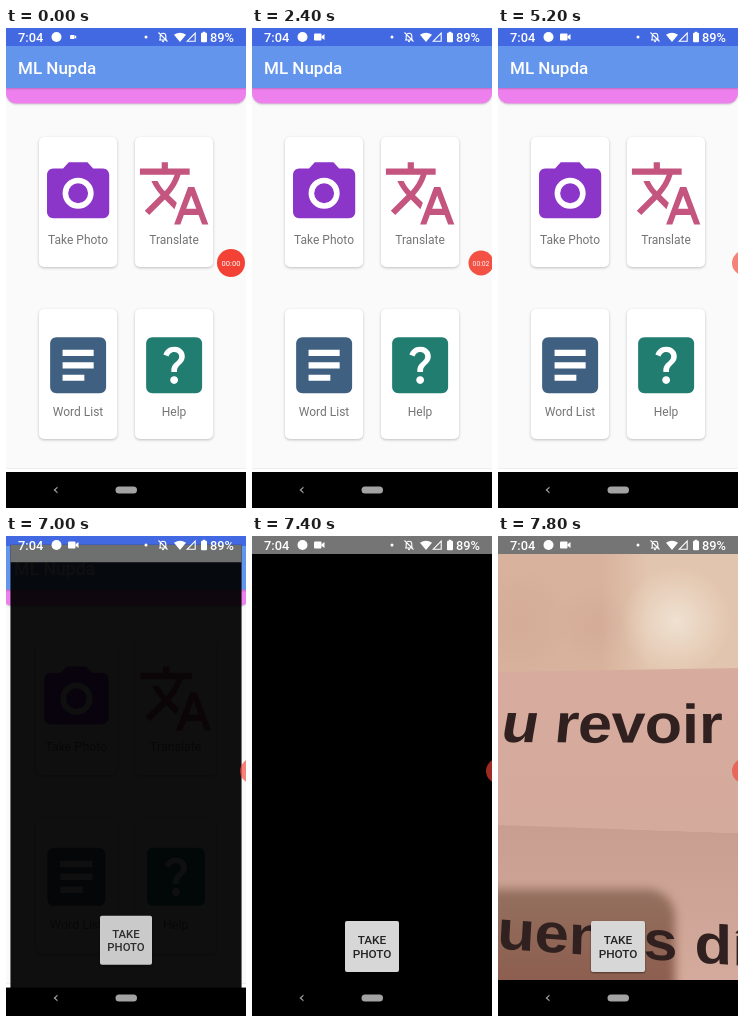
Write an HTML page with a canvas that moves like this. It is 240 px wide and 480 px high and loops after 8 s.

```html
<!DOCTYPE html>
<html lang="en">
<head>
<meta charset="utf-8">
<title>ML Nupda</title>
<style>
html, body { margin: 0; width: 100%; height: 100%; overflow: hidden; background: #000; }
canvas { display: block; width: 240px; height: 480px; }
</style>
</head>
<body>
<canvas id="stage"></canvas>
<script>
const W = 240, H = 480, LOOP = 8000, TICK = 200;
const canvas = document.getElementById('stage');
const ctx = canvas.getContext('2d');
const dpr = window.devicePixelRatio || 1;
canvas.width = W * dpr;
canvas.height = H * dpr;

const UI = 'Roboto, "Noto Sans", sans-serif';
const PRINT = '"Liberation Sans", Arial, sans-serif';
const SQUARE = 'M19 3H5c-1.1 0-2 .9-2 2v14c0 1.1.9 2 2 2h14c1.1 0 2-.9 2-2V5c0-1.1-.9-2-2-2z';

// Icons on a 24-unit grid: coloured shape, then white details
const CARDS = [
  { x: 33, y: 109, label: 'Take Photo', color: '#8b35c9',
    shape: 'M9 2L7.17 4H4c-1.1 0-2 .9-2 2v12c0 1.1.9 2 2 2h16c1.1 0 2-.9 2-2V6c0-1.1-.9-2-2-2h-3.17L15 2H9z',
    detail: 'M17 12a5 5 0 1 1-10 0a5 5 0 1 1 10 0zM15.2 12a3.2 3.2 0 1 0-6.4 0a3.2 3.2 0 1 0 6.4 0z' },
  { x: 129, y: 109, label: 'Translate', color: '#c3557f',
    shape: 'M12.87 15.07l-2.54-2.51.03-.03c1.74-1.94 2.98-4.17 3.71-6.53H17V4h-7V2H8v2H1v1.99h11.17C11.5 7.92 10.44 9.75 9 11.35 8.07 10.32 7.3 9.19 6.69 8h-2c.73 1.63 1.73 3.17 2.98 4.56l-5.09 5.02L4 19l5-5 3.11 3.11.76-2.04z' +
      'M18.5 10h-2L12 22h2l1.12-3h4.75L21 22h2l-4.5-12zm-2.62 7l1.62-4.33L19.12 17h-3.24z' },
  { x: 33, y: 281, label: 'Word List', color: '#3f6080', shape: SQUARE,
    detail: 'M7 7h10v2H7zM7 11h10v2H7zM7 15h7v2H7z' },
  { x: 129, y: 281, label: 'Help', color: '#217d70', shape: SQUARE,
    detail: 'M12.01 18c-.7 0-1.26-.56-1.26-1.26 0-.71.56-1.25 1.26-1.25.71 0 1.25.54 1.25 1.25-.01.69-.54 1.26-1.25 1.26z' +
      'M15.02 10.6c-.76 1.11-1.48 1.46-1.87 2.17-.16.29-.22.48-.22 1.41h-1.82c0-.49-.08-1.29.31-1.98.49-.87 1.42-1.39 1.96-2.16.57-.81.25-2.33-1.37-2.33-1.06 0-1.58.8-1.8 1.48l-1.65-.7C9.01 7.15 10.22 6 11.99 6c1.48 0 2.49.67 3.01 1.52.44.72.7 2.07.02 3.08z' }
];
for (const c of CARDS) {
  c.shape = new Path2D(c.shape);
  if (c.detail) c.detail = new Path2D(c.detail);
}

function rect(x, y, w, h, color) {
  ctx.fillStyle = color;
  ctx.fillRect(x, y, w, h);
}

function round(x, y, w, h, r, color) {
  ctx.fillStyle = color;
  ctx.beginPath();
  ctx.roundRect(x, y, w, h, r);
  ctx.fill();
}

function disc(x, y, r, color) {
  ctx.fillStyle = color;
  ctx.beginPath();
  ctx.arc(x, y, r, 0, Math.PI * 2);
  ctx.fill();
}

function poly(color, ...pts) {
  ctx.fillStyle = color;
  ctx.beginPath();
  for (let i = 0; i < pts.length; i += 2) ctx.lineTo(pts[i], pts[i + 1]);
  ctx.closePath();
  ctx.fill();
}

function text(s, x, y, font, color, align = 'left') {
  ctx.font = font;
  ctx.fillStyle = color;
  ctx.textAlign = align;
  ctx.fillText(s, x, y);
}

function shadow(color, blur, dy) {
  ctx.shadowColor = color;
  ctx.shadowBlur = blur * dpr;
  ctx.shadowOffsetY = dy * dpr;
}

function scoped(draw) {
  ctx.save();
  draw();
  ctx.restore();
}

function zoomed(scale, alpha, draw) {
  scoped(() => {
    ctx.globalAlpha = alpha;
    ctx.translate(W / 2, H / 2);
    ctx.scale(scale, scale);
    ctx.translate(-W / 2, -H / 2);
    draw();
  });
}

function card(c) {
  scoped(() => {
    shadow('rgba(0,0,0,.24)', 3, 1);
    round(c.x, c.y, 78, 130, 5, '#fff');
  });
  scoped(() => {
    ctx.translate(c.x + 1.8, c.y + 19);
    ctx.scale(3.11, 3.11);
    ctx.fillStyle = c.color;
    ctx.fill(c.shape);
    if (c.detail) {
      ctx.fillStyle = '#fff';
      ctx.fill(c.detail, 'evenodd');
    }
  });
  text(c.label, c.x + 39, c.y + 107, '12px ' + UI, '#757575', 'center');
}

function home() {
  rect(0, 0, W, 444, '#fafafa');
  rect(0, 440, W, 1, '#eeeeee');
  rect(0, 441, W, 3, '#fff');
  scoped(() => {
    shadow('rgba(0,0,0,.2)', 2, 1);
    round(0, 55, W, 20.5, [0, 0, 10, 10], '#ee80ee');
  });
  scoped(() => {
    shadow('rgba(0,0,0,.2)', 2, 1);
    rect(0, 18, W, 42, '#6495ed');
  });
  rect(0, 0, W, 18, '#4269e1');
  text('ML Nupda', 12, 46, '500 17px ' + UI, '#fff');
  CARDS.forEach(card);
}

function gradient(x0, y0, x1, y1, a, b) {
  const g = ctx.createLinearGradient(x0, y0, x1, y1);
  g.addColorStop(0, a);
  g.addColorStop(1, b);
  return g;
}

const vertical = (y0, y1, a, b) => gradient(0, y0, 0, y1, a, b);

function glow(x, y, r, rgb, a) {
  const g = ctx.createRadialGradient(x, y, 0, x, y, r);
  g.addColorStop(0, `rgba(${rgb},${a})`);
  g.addColorStop(1, `rgba(${rgb},0)`);
  rect(0, 18, W, 118, g);
}

const WARM = { desk: '#d6a078', bright: '#e6b78c', light: '238,216,186', dim: '184,126,88',
  top: '#e2a988', low: '#e2a986', fold: '#d59c7a', edge: '#94634a', dark: '#8a4a36', ink: '#30211d' };
const PINK = { desk: '#d8b29d', bright: '#e2c5ae', light: '244,234,220', dim: '194,146,126',
  top: '#d7ac9f', low: '#d4aa9c', fold: '#c79e8f', edge: '#94705f', dark: '#8d5f50', ink: '#30201f' };

// Printed words on the tilted sheet, leaning more towards its left edge
const TILT = .9;
function print(word, x, y, size, slope, lean, color) {
  ctx.font = `bold ${size}px ${PRINT}`;
  ctx.fillStyle = color;
  ctx.textAlign = 'left';
  for (const ch of word) {
    const w = ctx.measureText(ch).width;
    scoped(() => {
      ctx.translate(x, y + slope * x);
      ctx.transform(1, slope, -lean * Math.max(0, 1 - Math.max(0, x) / 130), TILT, 0, 0);
      ctx.fillText(ch, 0, 0);
    });
    x += w;
  }
}

function photo(p) {
  scoped(() => {
    ctx.beginPath();
    ctx.rect(0, 18, W, 426);
    ctx.clip();
    rect(0, 18, W, 426, gradient(105, 0, 150, 0, p.desk, p.bright));
    glow(178, 85, 55, p.light, .75);
    glow(20, 85, 55, p.dim, .2);
    glow(95, 88, 38, p.dim, .2);
    poly(vertical(132, 290, p.top, p.low), 0, 136, W, 132, W, 297, 0, 289);
    poly(vertical(290, 444, p.fold, p.low), 0, 289, W, 297, W, 444, 0, 444);
    scoped(() => {
      ctx.filter = `blur(${5 * dpr}px)`;
      round(-20, 353, 197, 120, [0, 28, 0, 0], vertical(352, 440, p.edge, p.dark));
    });
    print('Au revoir', -43, 206, 61, .005, .16, p.ink);
    print('Buenos días', -46, 412.5, 61.5, .07, .05, p.ink);
  });
}

function camera(view) {
  rect(0, 0, W, H, '#000');
  rect(0, 0, W, 18, '#757575');
  if (view) photo(view);
  scoped(() => {
    shadow('rgba(0,0,0,.45)', 2, 1);
    round(93, 385, 54, 51, 2, '#d7d7d7');
  });
  text('TAKE', 120, 408, '500 11.8px ' + UI, '#222', 'center');
  text('PHOTO', 120, 422, '500 11.8px ' + UI, '#222', 'center');
}

function statusBar(castScale) {
  const white = '#fff';
  text('7:04', 12, 14, '500 12.8px ' + UI, white);
  disc(50.5, 9, 5, white);
  scoped(() => {
    ctx.translate(67, 9);
    ctx.scale(castScale, castScale);
    round(-5, -3.5, 7.5, 7, 1, white);
    poly(white, 2.5, -.8, 5.5, -3, 5.5, 3, 2.5, .8);
  });
  disc(140, 9, 1.5, white);
  // muted bell
  ctx.strokeStyle = white;
  ctx.lineWidth = 1.1;
  ctx.beginPath();
  ctx.moveTo(153, 12);
  ctx.lineTo(161, 12);
  ctx.moveTo(154.2, 12);
  ctx.lineTo(154.2, 8.5);
  ctx.arc(157, 8, 2.8, Math.PI, 0);
  ctx.lineTo(159.8, 12);
  ctx.moveTo(152.5, 4.5);
  ctx.lineTo(161.5, 13.5);
  ctx.stroke();
  disc(157, 13.3, 1, white);
  // wi-fi, signal, battery
  ctx.fillStyle = white;
  ctx.beginPath();
  ctx.moveTo(174, 14);
  ctx.lineTo(168, 6.7);
  ctx.quadraticCurveTo(174, 2.8, 180, 6.7);
  ctx.fill();
  ctx.beginPath();
  ctx.moveTo(181.3, 13.2);
  ctx.lineTo(189.2, 13.2);
  ctx.lineTo(189.2, 5.2);
  ctx.closePath();
  ctx.stroke();
  round(195, 4.8, 6, 9.4, 1, white);
  rect(196.7, 3.8, 2.6, 1.5, white);
  text('89%', 204, 14, '500 12.8px ' + UI, white);
}

function navBar() {
  poly('#a0a0a0', 47.5, 462, 51.5, 458.5, 51.5, 460, 49.4, 462, 51.5, 464, 51.5, 465.5);
  round(109.5, 458.5, 21.5, 7, 3.5, '#a3a3a3');
}

// Linear blend through [time, value] stops
function blend(t, stops) {
  let [t0, v0] = stops[0];
  for (const [t1, v1] of stops) {
    if (t < t1) return v0 + (v1 - v0) * (t - t0) / (t1 - t0);
    [t0, v0] = [t1, v1];
  }
  return v0;
}

function recorder(t) {
  const x = blend(t, [[0, 225], [2000, 225], [2200, 226], [2400, 229], [2600, 232], [4600, 232], [4800, 237], [5000, 243], [5200, 246.5]]);
  const r = blend(t, [[0, 14], [2200, 13.8], [2400, 12.5]]);
  const alpha = blend(t, [[0, 1], [2200, 1], [2400, .92], [4600, .88], [5200, .65]]);
  scoped(() => {
    ctx.globalAlpha = alpha;
    disc(x, 235, r, '#f34235');
    if (t < 5200) {
      const sec = Math.max(0, Math.floor((t - 200) / 1000));
      text('00:0' + sec, x, 237.6, `${r * .54}px ${UI}`, '#fff', 'center');
    }
  });
}

function draw(t) {
  ctx.setTransform(dpr, 0, 0, dpr, 0, 0);
  rect(0, 0, W, H, '#000');
  if (t < 7400) {
    zoomed(blend(t, [[6800, 1], [7000, 1.036], [7200, 1.048]]), 1, home);
  }
  if (t >= 7000) {
    const view = t >= 7800 ? PINK : t >= 7600 ? WARM : null;
    zoomed(blend(t, [[7000, .963], [7200, .992], [7400, 1]]),
      blend(t, [[7000, .94], [7200, 1]]), () => camera(view));
  }
  statusBar(t < TICK ? .58 : 1);
  navBar();
  recorder(t);
}

const start = performance.now();
function frame() {
  const t = (performance.now() - start) % LOOP;
  draw(Math.floor(t / TICK) * TICK);
  requestAnimationFrame(frame);
}
frame();
</script>
</body>
</html>
```
